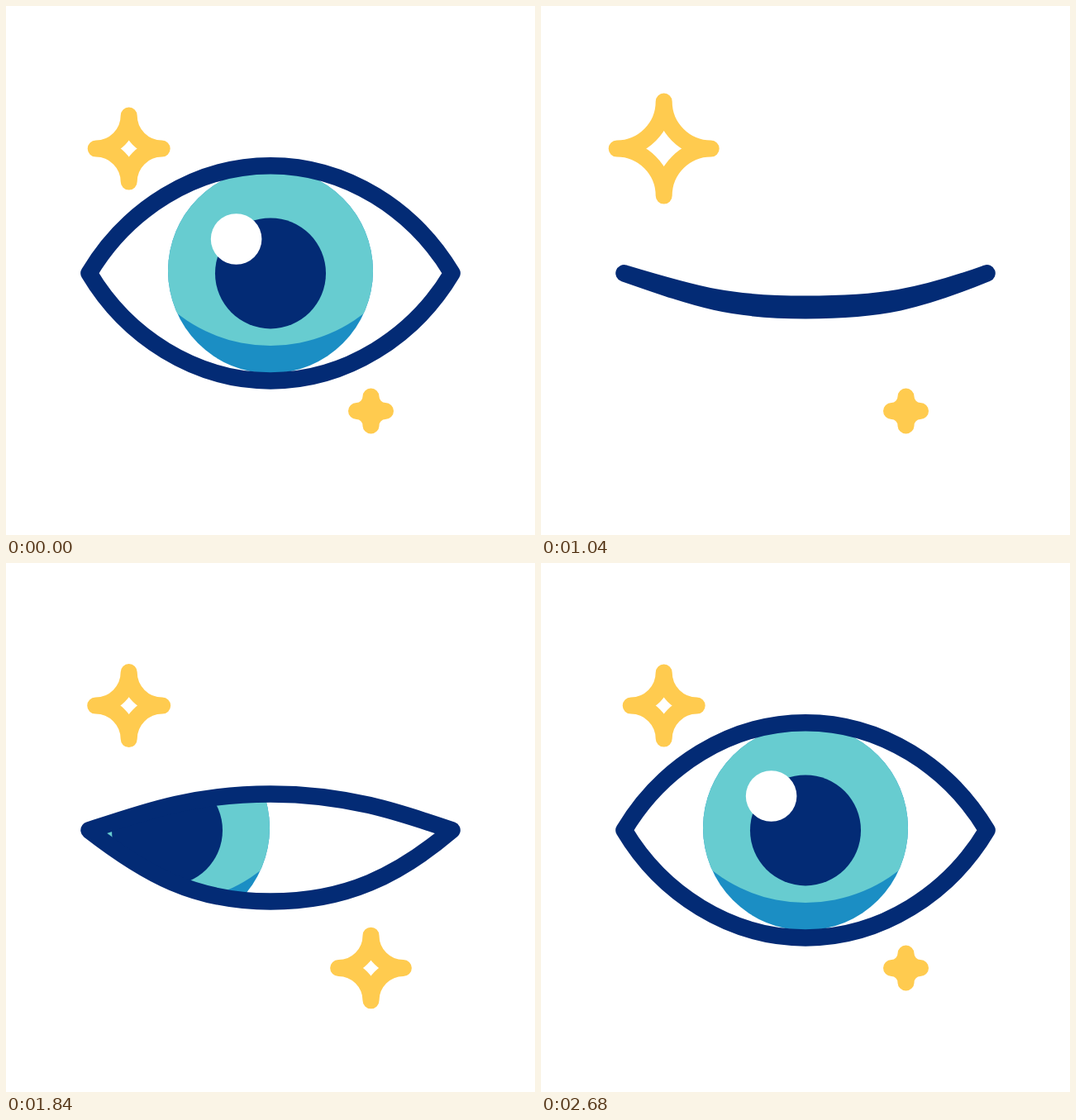
Recreate the animation shown at these times as an HTML page. Size 640 by 640 pixels, loop 3000 ms.

```html
<!DOCTYPE html>
<html lang="en">
<head>
<meta charset="utf-8">
<title>Blinking eye</title>
<style>
  html, body { margin: 0; height: 100%; overflow: hidden; background: #fff; }
  svg { display: block; width: 100vw; height: 100vh; }
  .line { fill: none; stroke-width: 20; stroke-linejoin: round; }
</style>
</head>
<body>
<svg viewBox="0 0 640 640">
  <defs>
    <clipPath id="opening"><path class="lids"/></clipPath>
    <clipPath id="ball"><circle cx="320" cy="320.4" r="124"/></clipPath>
  </defs>
  <g clip-path="url(#opening)">
    <g id="iris">
      <circle cx="320" cy="320.4" r="124" fill="#1b8ec4"/>
      <circle cx="320" cy="228.5" r="182.5" fill="#67ccd0" clip-path="url(#ball)"/>
      <circle cx="320" cy="323.4" r="67" fill="#032b75"/>
      <circle cx="278.6" cy="282" r="30.8" fill="#fff"/>
    </g>
  </g>
  <path class="lids line" stroke="#032b75" style="stroke-width:20.5"/>
  <path id="bigStar" class="line" stroke="#ffcb4f" transform="translate(148.7 172.6)"/>
  <path id="smallStar" class="line" stroke="#ffcb4f" transform="translate(441.5 490)"/>
</svg>
<script>
const LOOP = 3000, STEP = 40;
const $ = id => document.getElementById(id);
const lids = document.querySelectorAll('.lids');

const mix = (a, b, k) => a + (b - a) * k;

// Eased progress from 0 to 1 between two times
const ease = (t, from, to) => {
  const u = Math.min(1, Math.max(0, (t - from) / (to - from)));
  return u * u * (3 - 2 * u);
};

// Rise and fall, 400 ms each way
const pulse = (t, start) =>
  ease(t, start, start + 400) - ease(t, start + 400, start + 800);

// One lid: both corners fixed, the apex and corner handles move as it closes
function lid(side, closed) {
  const left = 100.5, right = 539.5, y = 323.3;
  const apex = mix(y + side * 130.1, 365.7, closed);
  const handleX = shut => mix(45.5, shut, closed);
  const handleY = shut => y + mix(side * 76.5, shut, closed);
  const points = [[left, y], [left + handleX(92.5), handleY(30.5)], [228.5, apex], [320, apex],
                  [411.5, apex], [right - handleX(83), handleY(32.5)], [right, y]];
  return side < 0 ? points : points.reverse();
}

function eyePath(closed) {
  const [start, ...top] = lid(-1, closed);
  const [, ...bottom] = lid(1, closed);
  return `M${start}C${[...top, ...bottom].join(' ')}Z`;
}

const starPath = r => {
  const arc = (x, y) => `A${r} ${r} 0 0 0 ${x} ${y}`;
  return `M0 ${-r}${arc(r, 0)}${arc(0, r)}${arc(-r, 0)}${arc(0, -r)}Z`;
};

function draw(now) {
  const t = Math.floor(now % LOOP / STEP) * STEP;
  const look = 125 * ease(t, 200, 750) - 250 * ease(t, 1041, 1750) + 125 * ease(t, 2041, 2675);
  const shape = eyePath(pulse(t, 600) + pulse(t, 1640));
  lids.forEach(path => path.setAttribute('d', shape));
  $('iris').setAttribute('transform', `translate(${look} 0)`);
  $('bigStar').setAttribute('d', starPath(40 + 17.5 * (pulse(t, 600) + pulse(t, 1800))));
  $('smallStar').setAttribute('d', starPath(17.5 + 22.5 * (pulse(t, 200) + pulse(t, 1400))));
}

function tick() {
  draw(performance.now());
  requestAnimationFrame(tick);
}
tick();
</script>
</body>
</html>
```
